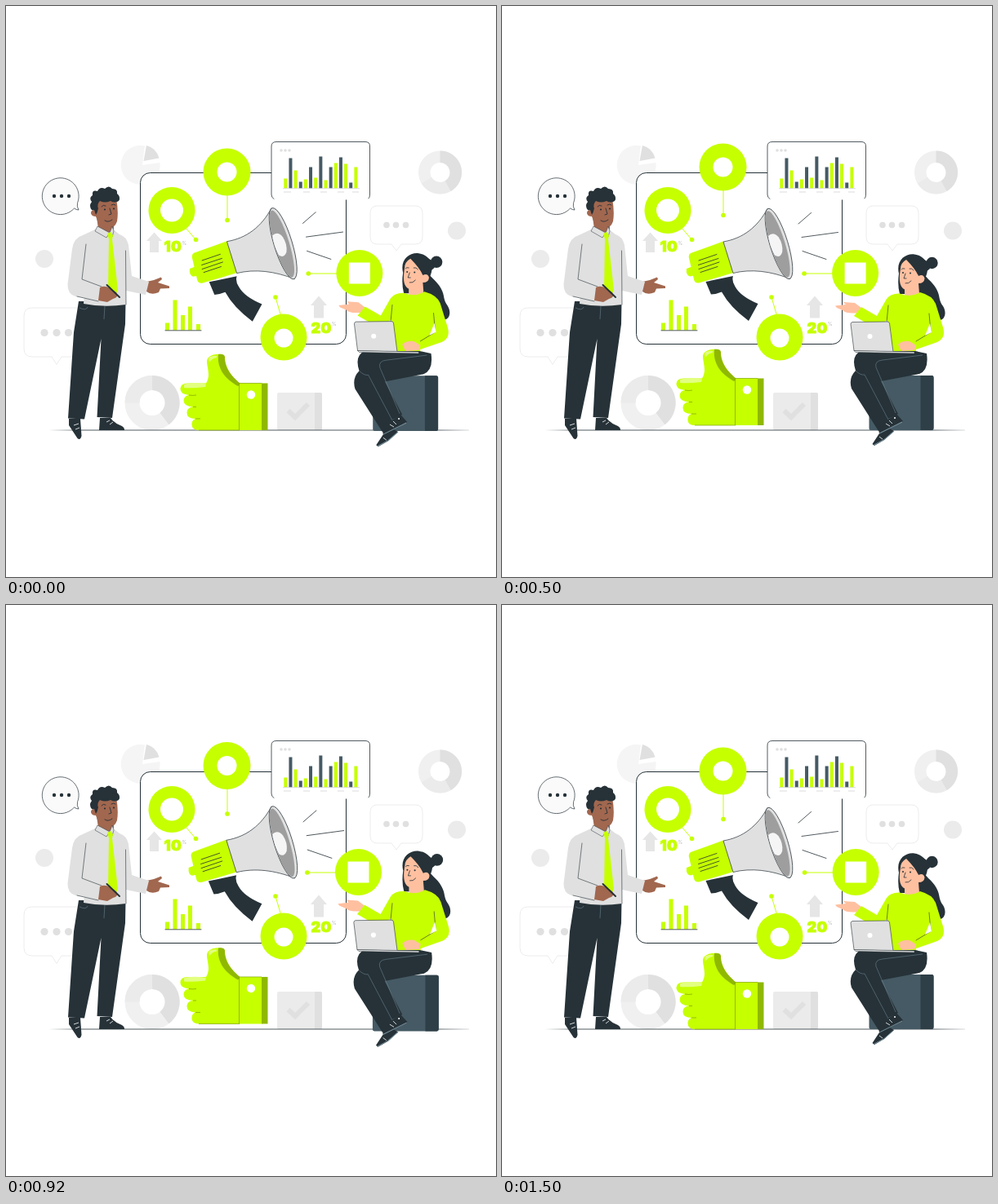
An HTML page for the animation above (1.54 s loop, 600 by 700 pixels).

```html
<!DOCTYPE html>
<html lang="en">
<head>
<meta charset="utf-8">
<title>Campaign meeting</title>
<style>
html, body { margin: 0; height: 100%; overflow: hidden; background: #fff; }
svg { display: block; width: 100vw; height: 100vh; }
.g { fill: #c6ff00; }
.d { fill: #263238; }
.e { fill: #e0e0e0; }
.l { fill: #ebebeb; }
.w { fill: #fff; }
.skin { fill: #ffc0a0; }
.tan { fill: #a1674f; }
.line { fill: none; stroke: #263238; stroke-width: .8; stroke-linecap: round; stroke-linejoin: round; }
.edge { stroke: #263238; stroke-width: .7; stroke-linejoin: round; }
.fold { fill: none; stroke: #78909c; stroke-width: .5; }
.lime { fill: none; stroke: #c6ff00; stroke-width: 1; }
.pale { fill: #fff; stroke: #e8e8e8; stroke-width: .8; }
text { font: 900 18px Inter, sans-serif; fill: #c6ff00; stroke: #c6ff00; stroke-width: .9; letter-spacing: .4px; }
text tspan { font-size: 6px; font-weight: 400; fill: #bbb; stroke: none; }
</style>
</head>
<body>
<svg viewBox="0 0 600 700">
  <!-- Background -->
  <path fill="#f5f5f5" d="M167 195L170 171.500A24 24 0 1 0 188.500 192Z"/>
  <path class="e" d="M168.500 190L172 171Q184 174 187.500 186.500Z"/>
  <g fill="none">
    <g stroke-width="14.500">
      <circle cx="531.500" cy="204" r="19.250" stroke="#f0f0f0"/>
      <path d="M531.500 184.750A19.250 19.250 0 0 1 541 220.800" stroke="#e0e0e0"/>
      <path d="M541 220.800A19.250 19.250 0 0 1 515 213.800" stroke="#ebebeb"/>
    </g>
    <g stroke-width="18">
      <circle cx="179" cy="486.500" r="24.500" stroke="#f0f0f0"/>
      <path d="M179 462A24.500 24.500 0 0 1 194 506" stroke="#e0e0e0"/>
      <path d="M154.500 486.500A24.500 24.500 0 0 1 179 462" stroke="#ebebeb"/>
    </g>
  </g>
  <circle class="l" cx="47" cy="310" r="11"/>
  <circle class="l" cx="552" cy="275.500" r="11"/>
  <path class="pale" d="M32 370H96Q106 370 106 380V420Q106 430 96 430H68L62 439.500 56 430H32Q22 430 22 420V380Q22 370 32 370Z"/>
  <g class="e"><circle cx="47" cy="400.500" r="4.600"/><circle cx="62" cy="400.500" r="4.600"/><circle cx="76.500" cy="400.500" r="4.600"/></g>
  <path class="pale" d="M455 245H501Q510 245 510 254V283Q510 292 501 292H484L478 300 472 292H455Q446 292 446 283V254Q446 245 455 245Z"/>
  <g class="e"><circle cx="466" cy="268.500" r="3.800"/><circle cx="477.500" cy="268.500" r="3.800"/><circle cx="489.500" cy="268.500" r="3.800"/></g>
  <path class="edge" fill="#fafafa" d="M83.500 248A22.400 22.400 0 1 1 87.500 241.500Q86.500 246 89 250Q86 250 83.500 248Z"/>
  <g class="d"><circle cx="59" cy="233" r="2.200"/><circle cx="68" cy="233" r="2.200"/><circle cx="77" cy="233" r="2.200"/></g>

  <!-- Panel -->
  <rect class="edge w" x="164.500" y="204.500" width="252" height="210" rx="12" style="stroke-width:1"/>
  <g fill="#e6e6e6">
    <path d="M181.500 277.500L191 288H187V302H176V288H172Z"/>
    <path d="M383 355.500L393 367H389V382.500H377V367H373Z"/>
  </g>
  <text x="193.500" y="300.500">10<tspan dy="-8">%</tspan></text>
  <text x="373.500" y="401">20<tspan dy="-9">%</tspan></text>
  <path class="g" d="M195 388.500h5v9h-5zM204.500 360.500h5v37h-5zM214 379h5v18.500h-5zM223 368.500h5v29h-5zM233 390h5v7.500h-5z"/>
  <path class="line" d="M195 397.800H239"/>

  <!-- Megaphone -->
  <g id="megaphone">
    <path class="d" d="M249.500 338L256 353.500Q262 353.500 269 350.500Q279 369 302 386L313.500 365Q292 356 285.500 344Q281 337 283 331Z"/>
    <path class="g" d="M226 322L234 319 237 330 230 331.500Q225 330 226 322Z"/>
    <path class="g" d="M231 303L271 288.500 283.500 327 241 339.500Q236 340 235 335L229 309Q228 305 231 303Z"/>
    <path class="e edge" d="M271 289C295 285 313 271 325 248.500L353 334.500C329 325 305 322 283 327.500Z"/>
    <g transform="translate(339 291.500) rotate(-17)">
      <ellipse class="e edge" rx="11" ry="45"/>
      <ellipse fill="#9e9e9e" cx="-1.500" rx="9" ry="42.500"/>
      <path fill="#f5f5f5" d="M-9.700 -13Q-2 -17 2 -8Q5 2 1 11Q-4 18 -9 12Q-11.500 0 -9.700 -13Z"/>
    </g>
    <path class="line" d="M241 312L263 304.500M240.500 317.500L265 309.500M241 322.500L266 314M243 326.500L264 319.500"/>
    <path class="line" d="M363 267L378.500 253.500M367 283.500L411.500 277.500M368 300.500L397 310.500"/>
  </g>

  <!-- Badges -->
  <g id="topBadge">
    <path class="lime" d="M271 230V262"/><circle class="g" cx="271" cy="262.500" r="2.800"/>
    <circle class="g" cx="270.500" cy="203.500" r="29"/><circle class="w" cx="270.500" cy="203.500" r="12"/>
  </g>
  <g>
    <path class="lime" d="M220 272L232.500 286.500"/><circle class="g" cx="232.500" cy="286.500" r="2.800"/>
    <circle class="g" cx="203" cy="250.500" r="28.500"/><circle class="w" cx="203" cy="250.500" r="14"/>
  </g>
  <g>
    <path class="lime" d="M337 381L330 357"/><circle class="g" cx="330" cy="357" r="2.800"/>
    <circle class="g" cx="340" cy="406" r="28.500"/><circle class="w" cx="340" cy="407" r="11.500"/>
  </g>
  <g id="sideBadge">
    <path class="lime" d="M369.600 328H405"/><circle class="g" cx="369.600" cy="328" r="2.800"/>
    <circle class="g" cx="432.200" cy="327.500" r="28.500"/><rect class="w" x="419.200" y="314.500" width="26" height="26"/>
  </g>

  <!-- Chart card -->
  <rect class="w" x="325" y="166.500" width="120.500" height="71" rx="5"/>
  <path class="line" d="M328 236.500Q325 235 325 231V172Q325 166.500 331 166.500H440Q445.500 166.500 445.500 172V231Q445.500 235 444 236"/>
  <g class="e"><circle cx="337" cy="177" r="1.800"/><circle cx="342" cy="177" r="1.800"/><circle cx="347" cy="177" r="1.800"/></g>
  <g id="bars"></g>
  <path stroke="#ccc" stroke-width=".7" d="M339 223.700H433M340 228H349M364 228H372M385 228H393M406 228H414M424 228H432"/>

  <!-- Floor -->
  <linearGradient id="fade"><stop stop-color="#263238" stop-opacity="0"/><stop offset=".08" stop-color="#263238"/><stop offset=".92" stop-color="#263238"/><stop offset="1" stop-color="#263238" stop-opacity=".2"/></linearGradient>
  <rect class="l" x="332" y="474" width="55" height="46" rx="2"/>
  <path class="e" d="M378 474H385Q387 474 387 476V518Q387 520 385 520H378Z"/>
  <path fill="none" stroke="#e0e0e0" stroke-width="6" d="M345.500 496L354 504 370 488"/>
  <rect x="52" y="519.600" width="515" height=".8" fill="url(#fade)"/>

  <!-- Thumb -->
  <g id="thumb">
    <path class="g" d="M245 462.500C251 453 246 443 246 436C246 427 261 425 266 428C269 442 274 453 286 462.500V520H236Q227 520 227.500 512Q228 507 232 506Q221 506 221.500 498Q222 492 229 491.500Q218 491 217.500 484Q218 477.500 224 477Q213 476 213.500 469Q214 462.500 222 462.500Z"/>
    <path fill="#8fb800" d="M260 427Q267 426 268 430C268 446 278 455 287 463L284 466C270 458 258 446 260 427Z"/>
    <path fill="#e2ff80" d="M218 464Q226 461 245 463.500L244 467Q228 469 218 468ZM248 432Q252 428 258 429L258 431Q252 432 249 437Z"/>
    <path class="g" d="M286 462.500H314V520H286Z"/>
    <path fill="#8fb800" d="M313 462.500H320.500V520H313Z"/>
    <circle class="w" cx="300" cy="476.500" r="5.200"/>
    <path fill="none" stroke="#7ea300" stroke-width=".7" d="M285.500 462.500V520M286 462.500H313M224 477Q229 478 233 477M229 491.500H233M232 506H238M236 520H286"/>
  </g>

  <!-- Standing man -->
  <g>
    <path class="d" d="M77 506L91 506 92.500 527Q91 533 87.500 530L77 514ZM115 505H128Q133 512 142 515Q145.500 517 145 520H114Z"/>
    <path fill="none" stroke="#fff" stroke-width=".8" d="M83 514L89 512M85 519L90 517M123 510L127 508M127 513L131 510"/>
    <path class="d" d="M89 362H146.500L146 390 130 505 111.500 504 116.500 408 96 506.500 76 505.500 83 400Z"/>
    <path class="fold" d="M121 367L120 384M90 370Q98 374 100 369"/>
    <path class="tan" d="M172 338L181 336 190 332.500 191 335 186 339 200 343.500 200 346 189 346.500 187 351Q178 355 172 350Z"/>
    <path class="e" d="M111 273L94 281Q83 284 81 298L75.500 341Q75 353 85 356L113 362 117 345 97 338 95 365Q120 370 147 366V349L171 354 175 338 154 331 150 293Q148 283 139 280L130 273Z"/>
    <path class="line" style="stroke-width:.6" d="M98 292L93 335 117 344M146.500 300L147 366M87 356L113 362"/>
    <path class="tan" d="M110 252L132 255V273Q125 283 113 273Z"/>
    <path class="tan" d="M109 239L135 236Q138 252 136 264Q133 273 124 272Q113 270 110 258Q104 258 104 253Q106 248 109 250Z"/>
    <path class="d" d="M110 256L108 250 105 250Q101 245 105 240Q101 235 106 232Q105 225 112 227Q115 221 121 224Q126 219 130 224Q137 224 136 230Q141 234 138 239Q133 242 128 239Q121 242 115 239Q111 243 113 248Q112 253 110 256Z"/>
    <path class="line" style="stroke-width:.9" d="M117 246Q119 243 122 245M129 244Q132 242 134 244M127 248L129 255 126 256M121 263Q125 266 130 262"/>
    <g class="d"><circle cx="121" cy="249.500" r="1.100"/><circle cx="132" cy="248.500" r="1.100"/></g>
    <path class="e edge" style="stroke-width:.5" d="M112 270L109 276 123 284 127 278ZM130 270L132 276 130 283 127 278Z"/>
    <path class="g" d="M124 279L128 277 131 281 130 286 137 348 132 359 125 347 126 286Z"/>
    <path class="tan" d="M115 345Q121 342 127 346L135 351Q139 357 131 359L124 363 113 361Z"/>
    <path class="line" style="stroke-width:2" d="M123.500 342L139 357"/>
  </g>

  <!-- Seated woman -->
  <g id="woman">
    <rect x="449.500" y="453" width="79" height="67" rx="2" fill="#455a64"/>
    <path fill="#2f3f47" d="M512.500 453H526Q528.500 453 528.500 456V517Q528.500 520 526 520H512.500Z"/>
    <circle class="d" cx="526.500" cy="315" r="7.200"/>
    <path class="d" d="M514 309L522 314 524 322 514 330Z"/>
    <path class="d" d="M513 322C517 333 527 337 532 347C537 356 534 360 540 368C545 376 542 385 536 385C538 379 527 378 522 369C510 360 506 346 509 330Z"/>
    <path class="d" d="M486 328C482 312 494 303 505 304.500C515 306 521 313 521 322C521 333 514 337 513 353H487Q484 342 486 328Z"/>
    <path class="skin" d="M488 322C486 334 486 344 493 347.500V354Q500 360 511 353L510 340Q517 340 517.500 334Q516 328 510 331Q506 322 495 311Q488 315 488 322Z"/>
    <path class="line" d="M489 323Q490 321 493 322M499 322Q502 321 504 324M494 328L492 334H495M494 340Q498 341 501 337"/>
    <g class="d"><circle cx="491" cy="327" r="1"/><circle cx="500" cy="327.500" r="1"/></g>
    <path class="skin" d="M440 370L432 364 418 363 421 366 408 367.500 410 370 417 373Q422 378 437 376Z"/>
    <path class="g" d="M487 352.500Q500 358 512 351Q527 355 531 365L540 394Q544 407 533 412L507 421V426H470L472 385 457 395 431 380 440 369 459 380 471 359Q476 352 487 352.500Z"/>
    <path class="line" style="stroke-width:.6" d="M473 367L471 388M523 377L525 400 507 411"/>
    <path class="w" d="M524 389L526 400 518 404Z"/>
    <path class="d" d="M439 423L506 423 520 426Q523 446 511 451L464 460 485 500 473 506 475 513 461 521 428 469Q424 456 433 447Q427 429 439 423Z"/>
    <path class="fold" d="M515 428L466 434Q456 435 458 443L482 499M433 447Q439 453 444 452L473 507"/>
    <path class="d" d="M461 519L474 506 483 500 491 509Q482 515 475 518L462 524ZM453.500 537L462 524 473 517 480 521 468 532 456 539Z"/>
    <path fill="none" stroke="#78909c" stroke-width="1" d="M462 524L490 510M455 538.500L468 531.500 480 521"/>
    <path fill="none" stroke="#fff" stroke-width=".8" d="M470 512L475 515M474 508L478 512M462 528L466 531"/>
    <circle class="w" cx="481" cy="505" r="1"/>
    <path class="e edge" style="stroke-width:.6" d="M429 387.500L472 387Q474 387 474.500 389L479 424 431 422.500 427 390Q427 388 429 387.500Z"/>
    <path class="e edge" style="stroke-width:.5" d="M431 422.500L505 424V426L433 424.500Z"/>
    <circle class="w" cx="450.500" cy="405" r="3"/>
    <path class="skin" d="M485 415Q490 410 499 411L507 416 505 422 489 423Z"/>
  </g>
</svg>
<script>
const LOOP = 1540;
const get = id => document.getElementById(id);

get('bars').innerHTML = [12, 37, 22, 8, 11, 26, 13, 39, 10, 26, 31, 38, 30, 7, 26]
  .map((h, i) => `<rect x="${340.3 + i * 6.15}" y="${223.5 - h}" width="4" height="${h}" fill="${i % 2 ? '#455a64' : '#c6ff00'}"/>`)
  .join('');

const wave = (t, peak, period) => Math.cos(2 * Math.PI * (t - peak) / period);

// Quick swell, slower return
function beat(t) {
  if (t < 0 || t > 540) return 0;
  if (t < 160) return (1 - Math.cos(Math.PI * t / 160)) / 2;
  const p = (t - 160) / 380;
  return (1 - p) * Math.exp(-1.2 * p);
}

const move = (id, x, y) => get(id).setAttribute('transform', `translate(${x} ${y})`);
const zoom = (id, x, y, s) =>
  get(id).setAttribute('transform', `translate(${x} ${y}) scale(${s}) translate(${-x} ${-y})`);

function draw(now) {
  const t = now % LOOP;
  const lift = -3.8 * (1 + wave(t, 735, LOOP));
  move('topBadge', 0, lift);
  move('thumb', 0, lift);
  move('sideBadge', 1.2 * wave(t, 650, LOOP / 2), 0);

  const u = (t + 35) % LOOP;
  const scale = 1 + 0.093 * (beat(u) + beat(u - 600));
  zoom('megaphone', 319, 317, scale);
  zoom('woman', 474, 421.5, scale);
}

const start = performance.now();
function tick() {
  draw(performance.now() - start);
  requestAnimationFrame(tick);
}
tick();
</script>
</body>
</html>
```
